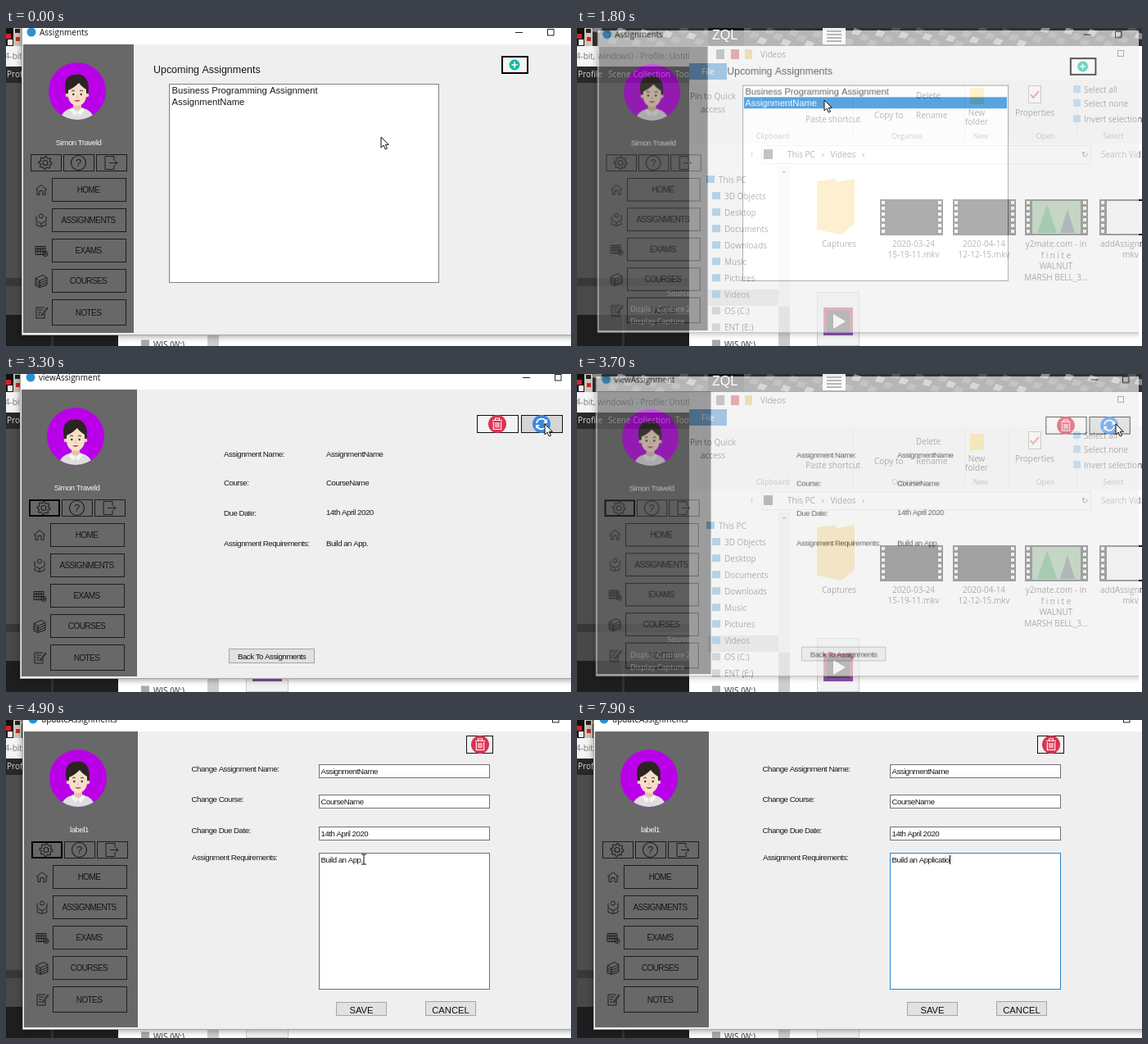
These frames come from a looping animation (690 by 388 pixels, 8 s). An HTML page with a canvas:

```html
<!DOCTYPE html>
<html lang="en">
<head>
<meta charset="utf-8">
<title>Assignments</title>
<style>
html, body { margin: 0; width: 690px; height: 388px; overflow: hidden; background: #fff; }
canvas { display: block; }
</style>
</head>
<body>
<canvas id="stage" width="690" height="388"></canvas>
<script>
const W = 690, H = 388, LOOP = 8000;
const stage = document.getElementById('stage').getContext('2d');
const layer = document.createElement('canvas');
layer.width = W; layer.height = H;
const layerCtx = layer.getContext('2d');
let c = stage;

const FORM = '"Liberation Sans", Arial, sans-serif';
const UI = '"Open Sans", "Noto Sans", sans-serif';
const USER = 'Simon Traveld';
const clamp = v => Math.max(0, Math.min(1, v));
const ease = v => v * v * (3 - 2 * v);

function rect(x, y, w, h, fill, line, lw = 1) {
  if (fill) { c.fillStyle = fill; c.fillRect(x, y, w, h); }
  if (line) {
    c.strokeStyle = line; c.lineWidth = lw;
    c.strokeRect(x + lw / 2, y + lw / 2, w - lw, h - lw);
  }
}
function disc(x, y, r, fill, ry = r) {
  c.fillStyle = fill;
  c.beginPath(); c.ellipse(x, y, r, ry, 0, 0, 7); c.fill();
}
function path(d, x, y, line, lw = 1, fill) {
  c.save(); c.translate(x, y);
  const p = new Path2D(d);
  if (fill) { c.fillStyle = fill; c.fill(p); }
  if (line) { c.strokeStyle = line; c.lineWidth = lw; c.stroke(p); }
  c.restore();
}
function text(s, x, y, size, color = '#1a1a1a', align = 'left', font = FORM, gap = 0) {
  c.font = size + 'px ' + font;
  c.letterSpacing = gap + 'px';
  c.textAlign = align; c.fillStyle = color;
  c.fillText(s, x, y);
}
const label = (s, x, y, color, align) => text(s, x, y, 9.7, color, align, FORM, -0.5);
const ui = (s, x, y, align, color = '#333', size = 10) => text(s, x, y, size, color, align, UI);

// ---- desktop behind the windows ----
function film(x, fill) {
  rect(x, 209, 77, 44, '#111');
  rect(x + 9, 211, 59, 40, fill);
  for (let i = 0; i < 6; i++) {
    rect(x + 2, 211 + i * 7, 4, 4, '#eee');
    rect(x + 71, 211 + i * 7, 4, 4, '#eee');
  }
}
function desktop(t) {
  rect(0, 0, W, 23, '#303030');
  for (let i = 0; i < 70; i++)
    path('M0 0L9 3L5 9L-4 7Z', 22 + i * 9.6, (i * 7) % 19 - 3, null, 0, i % 3 ? '#555' : '#8d8d8d');
  rect(0, 0, 9, 22, '#111');
  rect(9, 0, 10, 22, '#cfc4b5');
  rect(0, 7, 6, 6, '#d6202a'); rect(2, 14, 6, 7, '#eee');
  rect(11, 1, 6, 5, '#222'); rect(12, 11, 5, 5, '#c9262f');
  rect(160, 0, 44, 22, '#151515');
  text('ZQL', 165, 14, 16, '#fff', 'left', FORM);
  rect(300, 0, 28, 20, '#eee');
  for (let i = 0; i < 4; i++) rect(305, 3 + i * 4, 18, 2, '#333');

  rect(0, 22, 137, 25, '#f4f4f4');
  ui('64-bit, windows) - Profile: Untitled - Scene', -7, 38, 'left', '#777');
  rect(0, 47, 137, 20, '#292929');
  ui('Profile', 1, 60, 'left', '#ddd');
  ui('Scene Collection', 38, 60, 'left', '#ddd');
  ui('Tools', 120, 60, 'left', '#ddd');
  rect(0, 67, 137, 238, '#4d4d4d');
  rect(0, 305, 137, 10, '#383838');
  rect(0, 315, 137, 35, '#494949');
  rect(0, 350, 137, 38, '#1e1e1e');
  rect(55, 350, 3, 38, '#333');
  ui('Sources', 110, 327, 'left', '#ddd', 9);
  ui('Display Capture 2', 65, 346, 'left', '#ddd', 9);
  ui('Display Capture', 65, 361, 'left', '#ddd', 9);

  rect(137, 22, 553, 366, '#fff');
  rect(170, 26, 10, 12, '#777'); rect(188, 26, 10, 12, '#c33'); rect(205, 26, 9, 12, '#e6bd4b');
  ui('Videos', 224, 36);
  rect(660, 27, 8, 8, null, '#333');
  rect(137, 43, 46, 20, '#1979ca');
  ui('File', 160, 57, 'center', '#fff');
  rect(137, 63, 553, 78, '#f5f6f7');
  for (const x of [337, 473, 527, 610]) rect(x, 67, 1, 70, '#ddd');
  ui('Pin to Quick', 166, 87, 'center'); ui('access', 166, 103, 'center');
  ui('Paste shortcut', 279, 115); ui('Copy to', 363, 110);
  ui('Delete', 414, 86); ui('Rename', 414, 110);
  ui('New', 488, 107, 'center'); ui('folder', 488, 118, 'center');
  rect(480, 73, 17, 20, '#ffd768');
  ui('Properties', 559, 107, 'center');
  rect(551, 70, 16, 22, '#fff', '#888');
  path('M0 4L3 8L10 0', 554, 77, '#e0432c', 2);
  for (const y of [70, 87, 106]) rect(606, y, 9, 9, '#7ab8e6');
  ui('Select all', 619, 79); ui('Select none', 619, 96); ui('Invert selection', 619, 115);
  [['Clipboard', 239], ['Organise', 403], ['New', 493], ['Open', 572], ['Select', 655]]
    .forEach(([s, x]) => ui(s, x, 135, 'center', '#777', 9));
  rect(225, 143, 403, 23, '#fff', '#ddd');
  rect(228, 148, 11, 12, '#555');
  ui('↑', 211, 158); ui('This PC   ›   Videos   ›', 257, 158);
  ui('↻', 616, 158); ui('Search Vid…', 640, 158, 'left', '#777');

  rect(160, 319, 86, 20, '#d9d9d9');
  ['This PC', '3D Objects', 'Desktop', 'Documents', 'Downloads', 'Music', 'Pictures', 'Videos',
    'OS (C:)', 'ENT (E:)', 'WIS (W:)'].forEach((s, i) => {
    const y = 189 + i * 20.05, x = i ? 180 : 173;
    rect(x - 15, y - 9, 10, 9, i > 7 ? '#aaa' : '#4a9fd8');
    ui(s, x, y);
  });
  rect(246, 168, 14, 220, '#f0f0f0');
  rect(246, 340, 14, 48, '#cdcdcd');
  ui('⌃', 253, 182, 'center');

  path('M0 3L22 0L24 4L46 0V55L30 68L0 62Z', 293, 184, null, 0, '#f7d578');
  ui('Captures', 320, 267, 'center');
  film(370, '#161616'); film(459, '#161616'); film(547, '#79aa75'); film(638, '#f4f4f4');
  path('M0 38L12 3L24 38Z', 562, 212, null, 0, '#1d8940');
  path('M0 38L9 9L18 38Z', 590, 212, null, 0, '#3f4d55');
  ui('2020-03-24', 411, 267, 'center'); ui('15-19-11.mkv', 411, 280, 'center');
  ui('2020-04-14', 497, 267, 'center'); ui('12-12-15.mkv', 497, 280, 'center');
  ['y2mate.com - in', 'f i n i t e', 'WALNUT', 'MARSH BELL_3…'].forEach((s, i) =>
    ui(s, 585, 267 + i * 13.5, 'center'));
  ui('addAssignment', 639, 267); ui('mkv', 676, 280, 'center');
  if (t >= 1700) {
    rect(293, 322, 52, 66, '#f3f3f3', '#ccc');
    rect(301, 341, 36, 34, '#b8445f');
    rect(301, 366, 36, 9, '#8c50a8');
    rect(305, 345, 28, 26, '#555');
    path('M0 0L15 9L0 18Z', 313, 349, null, 0, '#fff');
  }
}

// ---- shared window parts ----
function avatar(x, y) {
  c.save();
  c.translate(x, y);
  disc(0, 0, 35, '#b900e8');
  c.beginPath(); c.arc(0, 0, 35, 0, 7); c.clip();
  disc(0, 34, 20, '#dedede', 14);
  rect(-5, 13, 10, 10, '#e4c4aa');
  path('M-6 20L0 26L6 20L9 23L3 30L0 26L-3 30L-9 23Z', 0, 0, null, 0, '#f5f5f5');
  path('M-13 5C-18 -10 -13 -20 -3 -20C8 -23 17 -13 13 5Z', 0, 0, null, 0, '#2c2422');
  disc(-12, 5, 2.3, '#edcfb5'); disc(12, 5, 2.3, '#edcfb5');
  path('M-11 -1C-6 -3 -2 -6 2 -10C5 -6 8 -4 11 -2V7C10 14 5 18 0 18C-5 18 -10 14 -11 7Z', 0, 0, null, 0, '#f6dfc8');
  disc(-4.7, 4, 1.2, '#332a28'); disc(4.7, 4, 1.2, '#332a28');
  path('M-7 0Q-5 -2 -3 0M3 0Q5 -2 7 0', 0, 0, '#463530');
  path('M0 5L-1 8H1', 0, 0, '#d9b698', .8);
  path('M-4 11Q0 15 4 11Z', 0, 0, null, 0, '#cf4a4a');
  c.restore();
}
const INK = '#1d1d1d';
const ICONS = [
  'M-7 0L0 -6L7 0M-5 -1V6H-2V1H2V6H5V-1',
  'M-2.5 -5a2.5 2.5 0 1 0 5 0a2.5 2.5 0 1 0 -5 0M-6 -5V1L0 4L6 1V-5M-6 3V6L0 8L6 6V3M0 4V8',
  'M-7 -5H5V5H-7ZM-7 -2H5M-7 1H5M-4 -5V5M-1 -5V5M2 -5V5M2 4a3 3 0 1 0 6 0a3 3 0 1 0 -6 0M5 2V4H7',
  'M-7 -3L2 -7L7 -4L-2 0ZM-7 -3V0L-2 3L7 -1V-4M-7 0V3L-2 6L7 2V-1M-7 3V6L-2 8L7 5V2M-2 0V8',
  'M4 -6H-6V7H4V1M-4 -3H2M-4 0H0M-4 3H-1M7 -6L1 2L0 4L2 3L8 -5Z'
];
function gear(x, y) {
  c.save(); c.translate(x, y);
  c.beginPath();
  for (let i = 0; i <= 32; i++) {
    const a = i / 32 * Math.PI * 2, r = i % 4 < 2 ? 8 : 6;
    c.lineTo(Math.cos(a) * r, Math.sin(a) * r);
  }
  c.strokeStyle = INK; c.lineWidth = 1.1; c.stroke();
  c.beginPath(); c.arc(0, 0, 3, 0, 7); c.stroke();
  c.restore();
}
function sidebar(dx, dy, x, y, right, bottom, name, focus) {
  rect(x, y, right - x, bottom - y, '#686868');
  c.save();
  c.translate(dx, dy);
  avatar(87, 77);
  label(name, 88.5, 143, '#f4f4f4', 'center');
  for (const bx of [30, 70, 110]) rect(bx, 154, 38, 21, null, INK);
  if (focus) rect(30, 154, 38, 21, null, '#000', 2);
  gear(48, 164.5);
  path('M-9 0a9 9 0 1 0 18 0a9 9 0 1 0 -18 0', 88.5, 164.5, INK, 1.1);
  text('?', 88.5, 169, 13, INK, 'center');
  path('M4 -3V-8H-7V8H4V3M-2 0H8M5 -3L8 0L5 3', 128, 164.5, INK);
  ['HOME', 'ASSIGNMENTS', 'EXAMS', 'COURSES', 'NOTES'].forEach((s, i) => {
    const y0 = Math.round(183 + i * 36.9), h = i > 3 ? 32 : 29;
    rect(56, y0, 91, h, null, INK);
    text(s, 100.5, y0 + h / 2 + 3.5, 10, '#161616', 'center', FORM, -0.6);
    path(ICONS[i], 43, y0 + h / 2, INK);
  });
  c.restore();
}
function frame(x, y, bottom, title, tx, ty, ctl) {
  c.save();
  c.shadowColor = 'rgba(0,0,0,.4)'; c.shadowBlur = 8; c.shadowOffsetY = 1;
  rect(x, -30, W + 20, bottom + 30, '#a8a8a8');
  c.restore();
  rect(x + 1, -30, W, bottom + 29, '#efefef');
  rect(x + 1, -30, W, y + 30, '#fff');
  disc(tx - 10, ty - 4, 5.5, '#2a92d4');
  ui(title, tx, ty, 'left', '#111');
  rect(ctl, ty - 4, 9, 1, '#222');
  rect(ctl + 39, ty - 8, 8.5, 8.5, null, '#222');
}
function trash(x, y) {
  disc(x, y, 11, '#db3350');
  path('M-6 -4.5H6M-2.5 -4.5V-7H2.5V-4.5M-4.7 -3V6.5H4.7V-3M-2 -2V4.5M0 -2V4.5M2 -2V4.5', x, y, '#fff', 1.1);
}
function button(s, x, y, w, h, size) {
  rect(x, y, w, h, '#e1e1e1', '#a5a5a5');
  if (size) text(s, x + w / 2, y + h - 3, size, '#111', 'center');
  else label(s, x + w / 2, y + h - 5, '#111', 'center');
}

// ---- the three windows ----
function listWindow(t) {
  frame(19, 20, 375, 'Assignments', 41, 9, 622);
  sidebar(0, 0, 21, 20, 156, 372, USER, false);
  text('Upcoming Assignments', 180, 55, 12.45);
  rect(605, 34, 33, 22, '#f4f4f4', '#000', 2);
  disc(621, 45, 6.5, '#1abc9c');
  path('M-3.5 0H3.5M0 -3.5V3.5', 621, 45, '#fff', 1.6);
  rect(199, 68, 330, 243, '#fff', '#7d8188');
  const picked = t >= 1200;
  if (picked) rect(201, 83, 326, 14, '#0078d7');
  text('Business Programming Assignment', 202.5, 80, 11.25);
  text('AssignmentName', 202.5, 93.5, 11.25, picked ? '#fff' : '#1a1a1a');
}
function viewWindow(t) {
  frame(17, 19, 372, 'viewAssignment', 40, 8, 631);
  sidebar(-2, -1, 19, 19, 160, 369, USER, true);
  rect(575, 50, 51, 22, '#f2f2f2', '#111');
  rect(629, 50, 51, 22, t >= 3000 ? '#d5d5d5' : '#f2f2f2', '#111');
  trash(600, 61);
  disc(654, 61, 11, '#3a87e0');
  path('M-6 -1A6 6 0 0 1 5 -3.5M6 1A6 6 0 0 1 -5 3.5', 654, 61, '#fff', 1.8);
  path('M7 -6V-1H2ZM-7 6V1H-2Z', 654, 61, null, 0, '#fff');
  [['Assignment Name:', 'AssignmentName', 101], ['Course:', 'CourseName', 136],
    ['Due Date:', '14th April 2020', 171.5], ['Assignment Requirements:', 'Build an App.', 210]]
    .forEach(([k, v, y], i) => {
      label(k, 266, y + (i === 2 ? 1 : 0));
      label(v, 391, y);
    });
  button('Back To Assignments', 272, 335, 105, 18);
}
const KEYS = [6300, 6600, 6800, 7000, 7300, 7600, 7900];
function editWindow(t) {
  frame(20, 14, 378, 'updateAssignments', 43, 2.9, 628);
  const focus = t >= 5000;
  sidebar(1, -6, 22, 14, 161, 375, 'label1', !focus);
  rect(562, 19, 33, 22, '#f2f2f2', '#111');
  trash(579, 30);
  [['Change Assignment Name:', 'AssignmentName', 54], ['Change Course:', 'CourseName', 91],
    ['Change Due Date:', '14th April 2020', 130]].forEach(([k, v, y]) => {
    label(k, 226.5, y + (y > 100 ? 7.5 : 9));
    rect(382, y, 209, 17, '#fff', '#707070');
    label(v, 384.5, y + 12);
  });
  label('Assignment Requirements:', 227, 171);
  rect(382, 162, 209, 167, '#fff', focus ? '#2b86cf' : '#707070');
  const n = KEYS.filter(k => t >= k).length;
  const typed = 'Build an App' + 'licatio'.slice(0, n);
  label(typed, 384.5, 173.5);
  const end = 384.5 + c.measureText(typed).width;
  if (n) rect(Math.round(end), 165, 1, 11, '#000');
  else {
    const marked = t >= 5600;
    if (marked) rect(end, 164, 3.2, 12, '#0078d7');
    label('.', end, 173.5, marked ? '#fff' : '#1a1a1a');
    if (marked) rect(end + 2, 165, 1, 10, '#123');
  }
  button('SAVE', 403, 344, 62, 17, 11.25);
  button('CANCEL', 512, 343, 62, 18, 11.25);
}

// ---- fades and pointer ----
function show(draw, t, opacity, scale) {
  if (opacity <= 0) return;
  if (opacity >= 1) { draw(t); return; }
  c = layerCtx;
  c.clearRect(0, 0, W, H);
  draw(t);
  c = stage;
  c.save();
  c.globalAlpha = opacity;
  c.translate(395, 175); c.scale(scale, scale); c.translate(-395, -175);
  c.drawImage(layer, 0, 0);
  c.restore();
}
function staged(draw, t, from, to) {
  const open = clamp((t - from) / 160), close = clamp((t - to) / 230);
  if (close > 0) show(draw, t, 1 - close, 1 - 0.043 * close);
  else show(draw, t, open, 0.97 + 0.03 * open);
}

const MOVES = [[100, 458, 133], [900, 302, 88], [2200, 302, 88], [3100, 658, 61], [4000, 658, 61], [4800, 437, 170]];
function pointer(t) {
  if (t >= 5600) return;
  let [, x, y] = MOVES[0];
  for (let i = 1; i < MOVES.length; i++) {
    const [t0, x0, y0] = MOVES[i - 1], [t1, x1, y1] = MOVES[i];
    if (t < t0) break;
    const k = ease(clamp((t - t0) / (t1 - t0)));
    x = x0 + (x1 - x0) * k; y = y0 + (y1 - y0) * k;
  }
  if (t >= 3900 && x < 590 && y > 162)
    path('M-3 -6H3M0 -6V6M-3 6H3', x, y, '#111');
  else
    path('M0 0V13L3 10L5.3 15L7.5 14L5.2 9.3H9.4Z', x, y, '#111', 1, '#fff');
}

function tick(now) {
  const t = Math.floor(now % LOOP / 100) * 100;
  c = stage;
  desktop(t);
  staged(listWindow, t, -1000, 1720);
  staged(viewWindow, t, 1845, 3620);
  staged(editWindow, t, 3740, 9000);
  pointer(t);
  requestAnimationFrame(tick);
}
requestAnimationFrame(tick);
</script>
</body>
</html>
```
